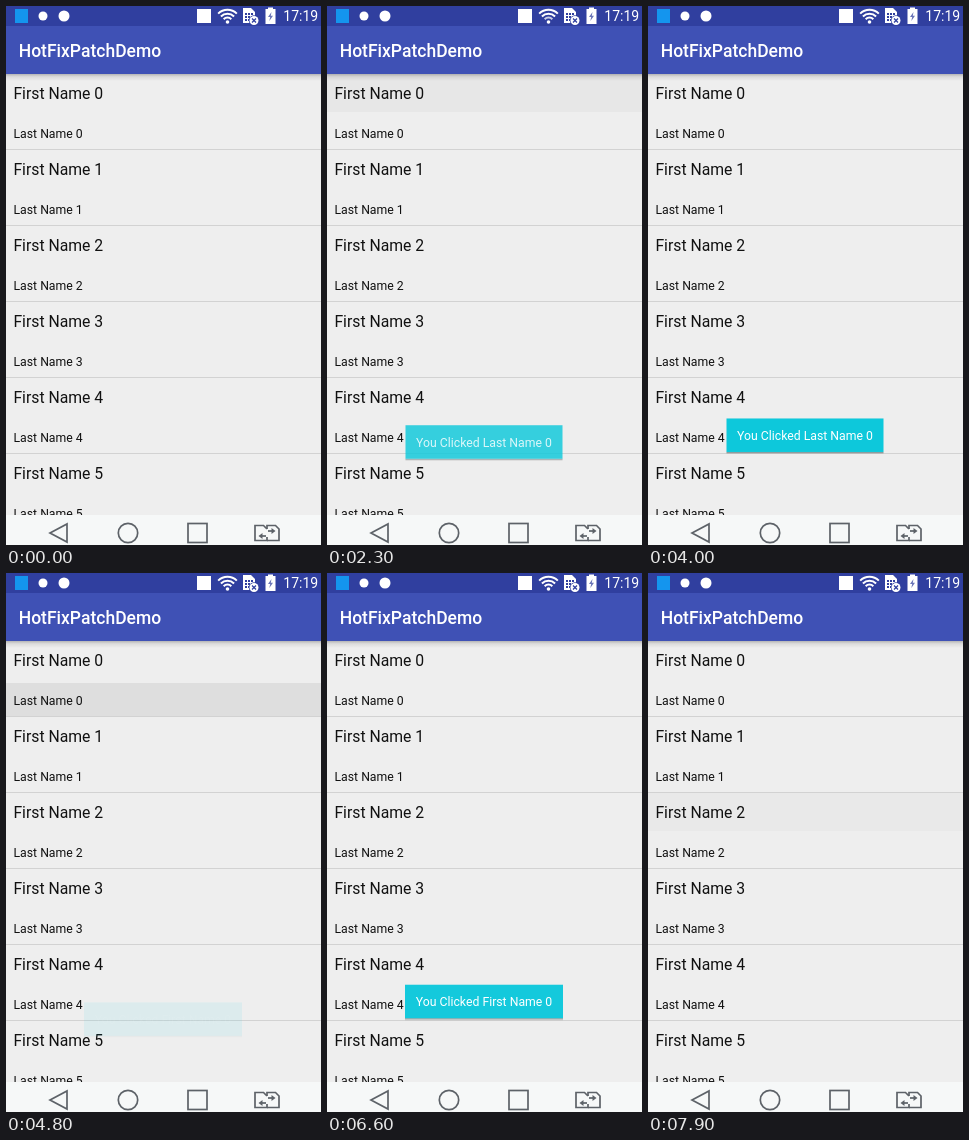
Recreate the animation shown at these times as an HTML page with a canvas. Size 315 px wide and 539 px high, loop 8000 ms.

```html
<!DOCTYPE html>
<html lang="en">
<head>
<meta charset="utf-8">
<title>HotFixPatchDemo</title>
<style>
html, body { margin: 0; width: 100%; height: 100%; overflow: hidden; background: #eee; }
canvas { display: block; width: 315px; height: 539px; }
</style>
</head>
<body>
<canvas id="stage"></canvas>
<script>
const W = 315, H = 539, LOOP = 8000, STEP = 100;
const LIST_TOP = 68, NAV_TOP = 509, ROW = 76;
const canvas = document.getElementById('stage');
const ctx = canvas.getContext('2d');
const dpr = window.devicePixelRatio || 1;
canvas.width = W * dpr;
canvas.height = H * dpr;

// Toasts slide up while fading in, and drop while fading out.
const toasts = [
  { text: 'You Clicked Last Name 0', show: 2300, enter: 2160, leave: 3900, x: 78.5, w: 157, fill: '#0dc8db' },
  { text: 'You Clicked First Name 0', show: 4800, enter: 4792, leave: 6540, x: 78, w: 158, fill: '#14c9dc' }
];
const SLIDE = 400, DROP = 18.8;

// Pressed cells: full shade until hold, then a fade until end.
const presses = [
  { y: 68, h: 38, start: 2100, hold: 2200, end: 2500, shade: 0.05 },
  { y: 110, h: 33, start: 4800, hold: 4800, end: 5150, shade: 0.065 },
  { y: 220, h: 38, start: 7900, hold: 8000, end: 8100, shade: 0.018 }
];

function rect(x, y, w, h, fill) {
  ctx.fillStyle = fill;
  ctx.fillRect(x, y, w, h);
}

function text(str, x, y, size, color, weight = 400) {
  ctx.font = `${weight} ${size}px Roboto, sans-serif`;
  ctx.fillStyle = color;
  ctx.fillText(str, x, y);
}

function line(points, close) {
  ctx.beginPath();
  points.forEach(([x, y], i) => i ? ctx.lineTo(x, y) : ctx.moveTo(x, y));
  if (close) ctx.closePath();
}

function disc(x, y, r, fill) {
  ctx.beginPath();
  ctx.arc(x, y, r, 0, Math.PI * 2);
  ctx.fillStyle = fill;
  ctx.fill();
}

function drawList(t) {
  rect(0, LIST_TOP, W, NAV_TOP - LIST_TOP, '#eeeeee');
  for (const p of presses) {
    if (t < p.start || t >= p.end) continue;
    const fade = t <= p.hold ? 1 : (p.end - t) / (p.end - p.hold);
    rect(0, p.y, W, p.h, `rgba(0,0,0,${p.shade * fade})`);
  }
  for (let i = 0; i < 6; i++) {
    const y = LIST_TOP + i * ROW;
    text('First Name ' + i, 7.4, y + 25.4, 15.75, '#111');
    text('Last Name ' + i, 7.5, y + 64, 12.25, '#111');
    rect(0, y + ROW - 1, W, 1, '#d2d2d2');
  }
}

function drawAppBar() {
  const shadow = ctx.createLinearGradient(0, 68, 0, 75);
  shadow.addColorStop(0, 'rgba(0,0,0,.24)');
  shadow.addColorStop(0.4, 'rgba(0,0,0,.08)');
  shadow.addColorStop(1, 'rgba(0,0,0,0)');
  rect(0, 68, W, 7, shadow);
  rect(0, 20, W, 48, '#3f51b5');
  text('HotFixPatchDemo', 12.7, 51, 17.5, '#fff', 500);
}

function drawWifi(t) {
  const weak = t >= 1000 && t < 3800;
  ctx.lineWidth = 2;
  [13.2, 9.3, 5.4].forEach((r, i) => {
    ctx.beginPath();
    ctx.arc(221.5, 17, r, -Math.PI * 0.75, -Math.PI * 0.25);
    ctx.strokeStyle = weak && i === 2 ? '#c9cde6' : '#fff';
    ctx.stroke();
  });
  disc(221.5, 16, 1.8, '#fff');
}

function drawSim() {
  line([[237, 2], [245, 2], [249, 6], [249, 17], [237, 17]], true);
  ctx.fillStyle = '#fff';
  ctx.fill();
  for (let y = 7; y < 15; y += 3) {
    for (let x = 239; x < 247; x += 3) rect(x, y, 2, 2, '#303f9f');
  }
  disc(248, 14.5, 5.2, '#303f9f');
  disc(248, 14.5, 4.5, '#fff');
  ctx.strokeStyle = '#303f9f';
  ctx.lineWidth = 1.3;
  line([[246, 12.5], [250, 16.5]]);
  ctx.stroke();
  line([[250, 12.5], [246, 16.5]]);
  ctx.stroke();
}

function drawBattery() {
  rect(262, 1.5, 5, 2, '#fff');
  rect(259.5, 3, 10, 15, '#fff');
  line([[265.5, 6], [262, 11], [264.2, 11], [263.3, 15], [267, 9.8], [264.8, 9.8]], true);
  ctx.fillStyle = '#6a75b8';
  ctx.fill();
}

function drawStatus(t) {
  rect(0, 0, W, 20, '#303f9f');
  rect(9, 3, 13, 14, '#1495ee');
  disc(37, 10, 4.5, '#fff');
  disc(58, 10, 5.5, '#fff');
  rect(191, 3, 14, 14, '#fff');
  drawWifi(t);
  drawSim();
  drawBattery();
  text('17:19', 277.3, 15, 14, '#fff');
}

function drawNav() {
  rect(0, NAV_TOP, W, H - NAV_TOP, '#f6f8f8');
  ctx.strokeStyle = '#5d6268';
  ctx.lineWidth = 1.7;
  line([[44, 527], [61, 518], [61, 536]], true);
  ctx.stroke();
  ctx.beginPath();
  ctx.arc(122, 527, 9.7, 0, Math.PI * 2);
  ctx.stroke();
  ctx.strokeRect(182, 517.5, 19, 19);

  // Two linked cards with opposite arrows.
  line([[261, 523], [257.5, 519.5], [249, 519.5], [249, 534.5], [261, 534.5], [261, 531]]);
  ctx.stroke();
  line([[261, 523], [261, 519.5], [269.5, 519.5], [273, 523], [273, 534.5], [261, 534.5]]);
  ctx.stroke();
  line([[260, 530], [254, 530]]);
  ctx.stroke();
  line([[262, 525], [268, 525]]);
  ctx.stroke();
  ctx.fillStyle = '#5d6268';
  line([[252.5, 530], [256.5, 527], [256.5, 533]], true);
  ctx.fill();
  line([[269.5, 525], [265.5, 522], [265.5, 528]], true);
  ctx.fill();
}

function drawToast(toast, t) {
  if (t < toast.show || t >= toast.leave + SLIDE) return;
  const q = t > toast.leave
    ? (t - toast.leave) / SLIDE
    : Math.max(0, 1 - (t - toast.enter) / SLIDE);
  const y = 411.3 + DROP * q * q;
  ctx.save();
  ctx.globalAlpha = 1 - q ** 4;
  rect(toast.x, y + 33.5, toast.w, 1, 'rgba(40,70,75,.5)');
  rect(toast.x, y + 34.5, toast.w, 1, 'rgba(0,0,0,.12)');
  rect(toast.x, y, toast.w, 33.5, toast.fill);
  ctx.textAlign = 'center';
  text(toast.text, 157, y + 21.3, 12.25, '#fff');
  ctx.restore();
}

function draw(now) {
  const t = Math.floor((now % LOOP) / STEP) * STEP;
  ctx.setTransform(dpr, 0, 0, dpr, 0, 0);
  drawList(t);
  drawAppBar();
  drawStatus(t);
  drawNav();
  toasts.forEach(toast => drawToast(toast, t));
}

const begin = performance.now();
function tick() {
  draw(performance.now() - begin);
  requestAnimationFrame(tick);
}
tick();
</script>
</body>
</html>
```
